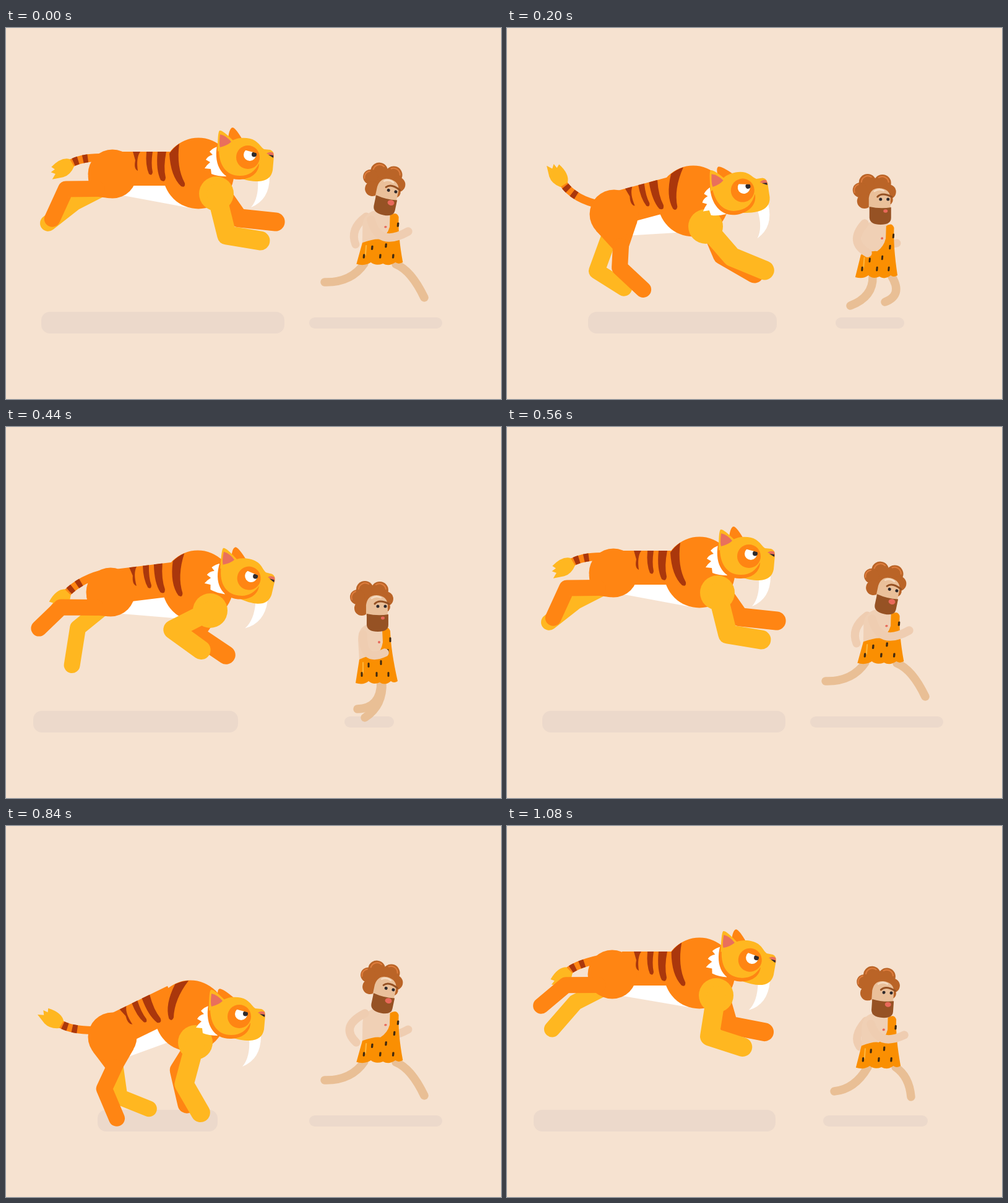
Animation, 800 px wide and 600 px high, one loop 1120 ms. Source, as an HTML page with a canvas:

```html
<!DOCTYPE html>
<html lang="en">
<head>
<meta charset="utf-8">
<title>Chase</title>
<style>
html, body { margin: 0; width: 100%; height: 100%; overflow: hidden; background: #f6e2d0; }
canvas { display: block; }
</style>
</head>
<body>
<canvas id="stage" width="800" height="600"></canvas>
<script>
const ctx = document.getElementById('stage').getContext('2d');
const STEP = 40, CYCLE = 560, RAD = Math.PI / 180;
const C = {
  ground: '#f6e2d0', shadow: '#ecd9cb',
  orange: '#ff8513', yellow: '#ffb720', stripe: '#aa370c', white: '#fff', pink: '#e9705c', dark: '#2f2a2d',
  hair: '#ba6427', shine: '#df7d3d', beard: '#965224', face: '#eac09a', glow: '#f5dcc4',
  skin: '#f0d0b5', arm: '#efcdb1', leg: '#e9bf95', cloth: '#fa8f02', spot: '#40290f', mouth: '#e8695a'
};

// Periodic cubic spline through rows of values at uneven times.
function track(period, times, rows) {
  const n = times.length;
  const key = i => {
    const j = (i + n) % n;
    return { t: times[j] + period * Math.floor(i / n), v: rows[j] };
  };
  return time => {
    const t = time % period;
    let i = n - 1;
    while (times[i] > t) i--;
    const [a, b, c, d] = [-1, 0, 1, 2].map(k => key(i + k));
    const h0 = b.t - a.t, h = c.t - b.t, h2 = d.t - c.t, u = (t - b.t) / h;
    return b.v.map((p, k) => {
      const q = c.v[k], s = (q - p) / h;
      const m0 = ((p - a.v[k]) / h0 * h + s * h0) / (h0 + h) * h;
      const m1 = (s * h2 + (d.v[k] - q) / h2 * h) / (h + h2) * h;
      return p + u * (m0 + u * (3 * (q - p) - 2 * m0 - m1 + u * (2 * (p - q) + m0 + m1)));
    });
  };
}

const gallop = (...rows) => track(CYCLE, [0, 120, 200, 280, 440, 520], rows);
const stride = (...rows) => track(CYCLE / 2, [0, 120, 160, 200, 240], rows);

const tiger = {
  shadow: gallop([57, 450], [108, 468], [131, 436], [148, 342], [44, 375], [43, 434]),
  chest: gallop([311, 235, 0], [309, 254, 5.5], [301, 280, 16.6], [298, 307, 30], [310, 257, 10.5], [311, 238, 2.7]),
  back: gallop([231, 200, 0], [224, 223, -8], [216, 253, -15], [207, 285, -26], [225, 224, -7], [231, 203, 0]),
  hip: gallop([172, 236], [173, 266], [173, 301], [172, 341], [169, 267], [170, 240]),
  thigh: gallop([-25, 24], [-11, 34], [11, 52], [3, 49], [-23, 25], [-23, 17]),
  shoulder: gallop([340, 268], [333, 292], [321, 321], [306, 350], [330, 297], [338, 274]),
  head: gallop([394, 206, 0, 0], [386, 224, -13.5, 0], [383, 259, -13.5, -12], [380, 305, 0, -20], [396, 242, 8, -10], [396, 214, 5, -5]),
  tail: gallop([168, 210, 125, 207, 103, 220], [160, 245, 115, 235, 102, 216], [155, 287, 108, 278, 90, 250],
    [160, 330, 108, 333, 86, 319], [165, 235, 122, 244, 97, 270], [165, 212, 112, 222, 98, 236]),
  // upper angle, upper length, lower angle, lower length
  nearFore: gallop([76, 69, 9.5, 55], [32, 67, 2, 56], [49, 65, 22.5, 57], [105, 70, 60, 53], [153, 67.5, 36, 56], [99, 67, 18, 56]),
  farFore: gallop([55, 54, 6, 60], [30, 58, 2, 58], [67, 56, 30, 60], [122, 59, 77, 56], [125, 52, 34, 61], [74, 55, 11, 59]),
  nearHind: gallop([162, 79, 114.6, 53], [119, 82, 45, 51], [84, 87, 43, 52], [99, 85, 67, 52], [163, 84, 136, 49], [167, 77, 140, 52]),
  farHind: gallop([153, 68, 142, 55], [136, 78, 70, 49], [110, 82, 32, 52], [82, 83, 22, 51], [141, 68, 99, 61], [153, 67, 131, 57])
};

const man = {
  shadow: stride([490, 705], [527, 640], [547, 627], [531, 642], [511, 680]),
  // x, y, angle, mouth size
  head: stride([608.5, 250.5, 12, 5.5], [595.5, 276, 0, 3], [590.5, 280, 0, 3], [595, 267, 0, 3.5], [598, 258.5, 4, 5]),
  // x, y, lean, width scale, height scale
  torso: stride([566.5, 380, .08, 1.1, .91], [567, 408, 0, 1.04, .98], [565, 412, 0, 1, 1], [563, 401, .08, 1, .95], [564, 389, .07, 1.06, .93]),
  nearArm: gallop([590, 310, 602, 356, 650, 329], [579, 335, 580, 378, 615, 361], [578, 316, 551, 346, 583, 364],
    [580, 303, 539, 324, 566, 350], [577, 335, 576, 382, 612, 365], [588, 320, 600, 358, 642, 338]),
  farArm: gallop([582, 305, 555, 325, 565, 350], [585, 330, 580, 365, 600, 365], [600, 330, 600, 355, 630, 348],
    [590, 310, 602, 356, 650, 329], [585, 335, 582, 370, 600, 365], [580, 315, 558, 340, 570, 357]),
  leg: track(CYCLE, [0, 120, 160, 200, 240, 280, 400, 440, 480, 520], [
    [630, 382, 655, 392, 676, 436], [611, 408, 622, 440, 607, 465], [608, 412, 610, 450, 580, 470],
    [591, 402, 592, 435, 555, 449], [583, 390, 562, 426, 529, 429], [579, 381, 558, 412, 515, 411],
    [606, 410, 608, 454, 547, 452], [606, 412, 606, 455, 568, 456], [622, 402, 640, 432, 611, 443],
    [628, 390, 650, 405, 653, 438]])
};

function fill(color, d) {
  ctx.fillStyle = color;
  ctx.fill(new Path2D(d));
}
function stroke(color, width, d, cap = 'round') {
  ctx.strokeStyle = color;
  ctx.lineWidth = width;
  ctx.lineCap = cap;
  ctx.lineJoin = 'round';
  ctx.stroke(new Path2D(d));
}
function oval(color, x, y, rx, ry = rx) {
  ctx.fillStyle = color;
  ctx.beginPath();
  ctx.ellipse(x, y, rx, ry, 0, 0, 7);
  ctx.fill();
}
function group(x, y, deg, draw) {
  ctx.save();
  ctx.translate(x, y);
  ctx.rotate(deg * RAD);
  draw();
  ctx.restore();
}
// Turns the drawing about a point that stays in place.
const turn = (x, y, deg, draw) => group(x, y, deg, () => { ctx.translate(-x, -y); draw(); });
const curve = ([x, y, cx, cy, ex, ey]) => `M${x} ${y}Q${cx} ${cy} ${ex} ${ey}`;
const polar = ([x, y], deg, r) => [x + r * Math.cos(deg * RAD), y + r * Math.sin(deg * RAD)];

function shadow([left, right], y, h, r) {
  ctx.fillStyle = C.shadow;
  ctx.beginPath();
  ctx.roundRect(left, y, right - left, h, r);
  ctx.fill();
}
function limb(color, width, root, [a1, l1, a2, l2], start = root) {
  const knee = polar(root, a1, l1);
  stroke(color, width, `M${start}L${knee}L${polar(knee, a2, l2)}`);
}
// Hull of two circles.
function taper(color, a, ra, b, rb) {
  const dx = b[0] - a[0], dy = b[1] - a[1];
  const dir = Math.atan2(dy, dx) / RAD;
  const off = Math.acos(Math.min(1, (ra - rb) / Math.hypot(dx, dy))) / RAD;
  fill(color, `M${polar(a, dir - off, ra)}L${polar(b, dir - off, rb)}L${polar(b, dir + off, rb)}L${polar(a, dir + off, ra)}Z`);
  oval(color, ...a, ra);
  oval(color, ...b, rb);
}

function drawTail([x, y, cx, cy, ex, ey]) {
  stroke(C.orange, 13, curve([x, y, cx, cy, ex, ey]), 'butt');
  ctx.setLineDash([0, 7, 8, 8, 8, 999]);
  stroke(C.stripe, 13, curve([ex, ey, cx, cy, x, y]), 'butt');
  ctx.setLineDash([]);
  group(ex, ey, Math.atan2(ey - cy, ex - cx) / RAD, () =>
    fill(C.yellow, 'M-4-7Q8-16 20-13L37-7L28-2L33 4L25 5L28 11Q6 17-4 7Z'));
}

function drawTigerHead([x, y, deg, ear]) {
  group(x, y, deg, () => {
    ctx.translate(-394, -206);
    fill(C.white, 'M407 245Q409 275 396 290Q426 278 426 241Z');
    turn(372, 184, ear, () => fill(C.orange, 'M358 186Q360 162 366 161Q371 161 383 182Z'));
    fill(C.white, 'M344 191Q334 194 329 200L334 205Q326 207 323 213L330 217Q325 221 321 227L331 228L332 236Q342 240 356 240Z');
    fill(C.yellow, 'M342 190C348 184 360 181 366 182C374 177 392 176 402 182C410 187 412 193 417 196L427 197Q433 199 433 207L431 230Q428 247 408 248C396 248 388 246 378 243C352 240 341 220 342 190Z');
    fill(C.orange, 'M341 190C335 225 352 246 378 245C399 244 409 232 409 219C402 232 393 239 378 239C356 239 343 222 344 192Z');
    turn(350, 188, -.6 * deg, () => {
      fill(C.yellow, 'M342 200Q342 168 345 166Q349 164 368 183Z');
      fill(C.pink, 'M346 172Q344 188 346 193Q358 190 364 184Q356 174 346 172Z');
    });
    oval(C.orange, 391, 209, 19);
    oval(C.white, 394, 205, 10);
    oval(C.dark, 401, 204.5, 4);
    fill(C.orange, 'M381 196L407 203L402 194L390 191Z');
    fill(C.pink, 'M421 203Q427 199 432 202L433 209Z');
    fill(C.dark, 'M424 205L432 206L432 210Z');
  });
}

function drawTiger(t) {
  const p = {};
  for (const part in tiger) p[part] = tiger[part](t);
  const [hx, hy] = p.hip, [cx, cy, lean] = p.chest, [sx, sy] = p.shoulder;
  const thigh = [hx + p.thigh[0], hy + p.thigh[1]];
  const belly = polar([cx, cy], 101 + lean, 57.5);

  shadow(p.shadow, 459, 35, 14);
  drawTail(p.tail);
  limb(C.yellow, 26, [hx, hy + 15], p.farHind);
  limb(C.orange, 30, [sx + 5, sy - 5], p.farFore);
  fill(C.white, `M${hx} ${hy}L${hx + 18} ${hy + 35}L${belly}L${cx} ${cy}Z`);
  group(...p.back, () => fill(C.orange, 'M-45 0H60V55H-45Z'));
  oval(C.orange, cx, cy, 57.5);
  taper(C.orange, p.hip, 39.5, thigh, 12.5);
  limb(C.orange, 26, p.hip, p.nearHind, thigh);
  group(...p.back, () => {
    fill(C.stripe, 'M-26 0H-14Q-21 10-18 31Q-25 28-22 14Z');
    fill(C.stripe, 'M-4 0H6Q3 20 6 33Q5 40 0 36Q-6 22-4 0Z');
    fill(C.stripe, 'M14 0H28Q23 25 27 42Q26 51 19 46Q11 30 14 0Z');
  });
  group(cx, cy, lean, () => fill(C.stripe, 'M-47-32Q-40-42-31-48Q-36-10-22 16Q-21 24-28 21Q-45 5-47-32Z'));
  oval(C.yellow, sx, sy, 28);
  limb(C.yellow, 31, p.shoulder, p.nearFore);
  drawTigerHead(p.head);
}

function drawTorso([x, y, lean, w, h]) {
  ctx.save();
  ctx.transform(w, 0, -lean, h, x, y);
  fill(C.skin, 'M6-34L4-68Q4-88 20-93H46V-34Z');
  oval(C.mouth, 38, -64, 2);
  fill(C.cloth, 'M6-36Q24-44 32-42Q42-50 44-64L43-85Q52-92 56-82Q57-50 68-1Q62 3 57-1Q48 7 39 1Q29 6 21-1Q13 6 0 2Z');
  stroke('#ffb63c', 2, 'M12-31V-14');
  for (const [sx, sy] of [[10, -12], [34, -12], [53, -12], [21, -27], [41, -31], [52, -49], [56, -68]])
    stroke(C.spot, 3, `M${sx} ${sy - 2.5}v5`);
  ctx.restore();
}

function drawManHead([x, y, deg, mouth]) {
  group(x, y, deg, () => {
    for (const [bx, by, r] of [[0, 0, 22], [-11, -17, 14], [13, -16, 14], [-23, -5, 12], [23, -2, 12], [-16, 13, 12], [21, 11, 9]])
      oval(C.hair, bx, by, r);
    stroke(C.shine, 2, 'M-21-18A10.5 10.5 0 0 1-5-26M7-25A10.5 10.5 0 0 1 23-18M-32-1A10 10 0 0 1-26-14');
    fill(C.face, 'M-9 25V8Q-7-8 8-8Q25-7 26 8V25Z');
    stroke(C.glow, 2.5, 'M0-3Q7-8 15-4');
    stroke(C.beard, 3, 'M5 6Q12-2 28 6');
    oval(C.dark, 10, 10, 2.5);
    oval(C.dark, 22, 10, 2.5);
    fill(C.beard, 'M-8 22Q10 26 27 23V40Q27 51 10 51Q-7 51-8 40Z');
    oval(C.mouth, 18, 29, mouth, mouth * .8);
  });
}

function drawMan(t) {
  const head = man.head(t);
  head[0] += 2 * Math.cos(2 * Math.PI * t / CYCLE);
  shadow(man.shadow(t), 468, 18, 9);
  stroke(C.arm, 13, curve(man.farArm(t)));
  for (const shift of [0, CYCLE / 2]) stroke(C.leg, 13.5, curve(man.leg(t + shift)));
  drawTorso(man.torso(t));
  stroke(C.arm, 13.5, curve(man.nearArm(t)));
  drawManHead(head);
}

function frame(now) {
  const t = Math.floor(now / STEP) * STEP % CYCLE;
  ctx.fillStyle = C.ground;
  ctx.fillRect(0, 0, 800, 600);
  drawTiger(t);
  drawMan(t);
  requestAnimationFrame(frame);
}
requestAnimationFrame(frame);
</script>
</body>
</html>
```
